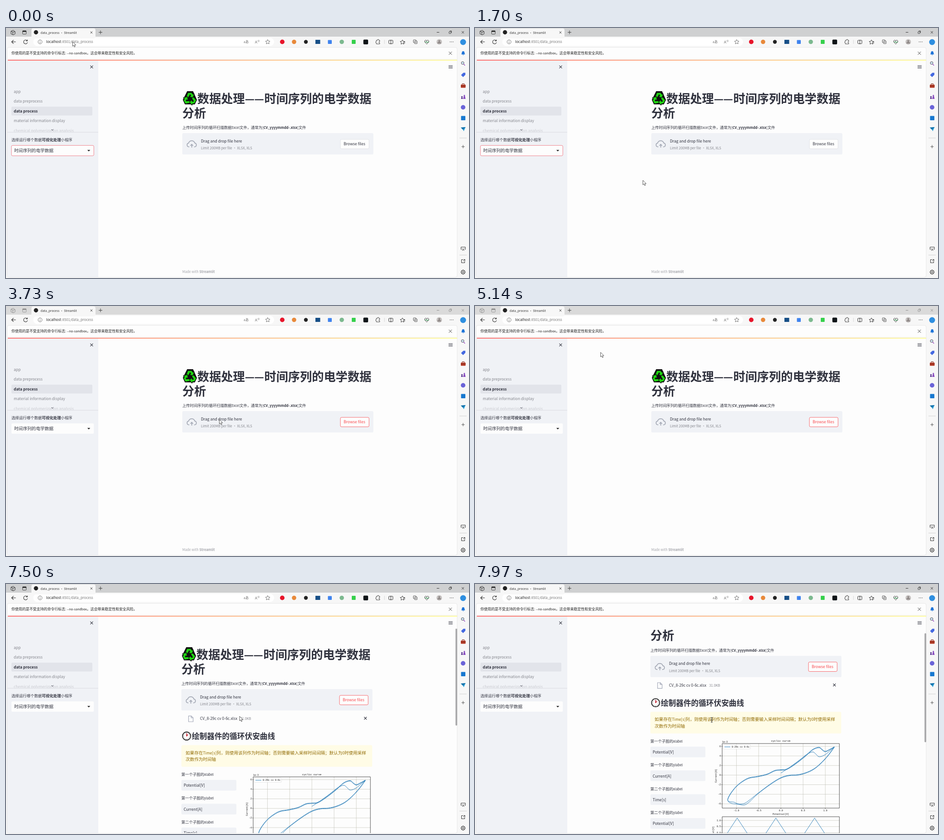
Animation, 1019 px wide and 550 px high, one loop 8 s. Source, as an HTML page with a canvas:

```html
<!DOCTYPE html>
<html lang="zh">
<head>
<meta charset="utf-8">
<style>
html, body { margin: 0; width: 100%; height: 100%; overflow: hidden; background: #f7f7f7; }
canvas { display: block; }
</style>
</head>
<body>
<canvas id="stage" width="1019" height="550"></canvas>
<script>
const LOOP = 8000;
const c = document.getElementById('stage').getContext('2d');
const SANS = '"Noto Sans CJK SC", "Noto Sans CJK JP", sans-serif';
const MONO = '"Liberation Mono", monospace';
const INK = '#31333f', DIM = '#85868d', PANEL = '#f0f2f6', RED = '#f8474c', UI = '#333', BLUE = '#1f77b4';

// Event times in ms
const HOVER = 2600, BLUR = 3050, UPLOADED = 6400, RESULTS = 6720, PLOTTED = 6980, SCROLL = 7710, IBEAM = 7800;

// Pointer stops: time, x, y
const pointer = [
  [0, 146.5, 30], [30, 150, 32], [420, 300, 130], [830, 420, 190], [1100, 560, 214], [1400, 760, 240],
  [1630, 822, 264], [1670, 560, 318], [1700, 369.5, 335], [1900, 369.5, 335], [2150, 440, 424],
  [2450, 720, 300], [2700, 772, 256], [3600, 778, 254], [3730, 470, 250], [4000, 340, 130],
  [4400, 257, 82], [4470, 256, 79], [4770, 256, 79], [4900, 260, 88], [5110, 260, 88],
  [5540, 488, 281], [5900, 488, 281], [6040, 489.5, 287], [6400, 489.5, 287], [7200, 506, 292],
  [7300, 511, 292], [7470, 513, 291.5], [7500, 514, 291], [7710, 514, 291], [7970, 521, 299]
];

const clamp = v => Math.max(0, Math.min(1, v));
const smooth = v => (v = clamp(v), v * v * (3 - 2 * v));

function pointerAt(t) {
  const i = pointer.findIndex(p => p[0] > t);
  if (i < 0) return pointer.at(-1).slice(1);
  const [t0, x0, y0] = pointer[i - 1], [t1, x1, y1] = pointer[i], k = (t - t0) / (t1 - t0);
  return [x0 + (x1 - x0) * k, y0 + (y1 - y0) * k];
}

function rect(x, y, w, h, fill, r = 0, stroke, lw = 0.8) {
  c.beginPath();
  c.roundRect(x, y, w, h, r);
  if (fill) { c.fillStyle = fill; c.fill(); }
  if (stroke) { c.strokeStyle = stroke; c.lineWidth = lw; c.stroke(); }
}
const disc = (x, y, r, fill, stroke, lw) => rect(x - r, y - r, 2 * r, 2 * r, fill, r, stroke, lw);
function line(d, color = UI, w = 0.9) {
  c.strokeStyle = color; c.lineWidth = w; c.stroke(new Path2D(d));
}
function shape(d, fill) { c.fillStyle = fill; c.fill(new Path2D(d)); }
const cross = (x, y, r, color, w) => line(`M${x - r} ${y - r}l${2 * r} ${2 * r}m0 ${-2 * r}l${-2 * r} ${2 * r}`, color, w);
function at(x, y, draw, angle = 0) {
  c.save(); c.translate(x, y); c.rotate(angle); draw(); c.restore();
}

// Text centred on y; Latin runs are set smaller than CJK runs, * toggles bold
function text(str, x, y, size, color = INK, family = SANS) {
  let bold = false;
  c.fillStyle = color;
  for (const part of str.split('*')) {
    for (const run of part.match(/[\x00-\x7f•·—]+|[^\x00-\x7f•·—]+/g) || []) {
      const px = run.charCodeAt(0) < 0x2e80 ? size / 1.117 : size;
      c.font = `${bold ? 'bold ' : ''}${px}px ${family}`;
      c.fillText(run, x, y + size * 0.36);
      x += c.measureText(run).width;
    }
    bold = !bold;
  }
}
function mono(str, x, y, size = 5, align = 'center') {
  c.font = `${size}px ${MONO}`;
  c.fillStyle = '#111';
  c.textAlign = align;
  c.fillText(str, x, y + size * 0.33);
  c.textAlign = 'left';
}

// Smooth curve through a flat list of x,y
function curve(list, color, w) {
  const p = [];
  for (let i = 0; i < list.length; i += 2) p.push([list[i], list[i + 1]]);
  c.beginPath();
  c.moveTo(...p[0]);
  for (let i = 0; i < p.length - 1; i++) {
    const a = p[i - 1] || p[i], b = p[i], d = p[i + 1], e = p[i + 2] || d;
    c.bezierCurveTo(b[0] + (d[0] - a[0]) / 6, b[1] + (d[1] - a[1]) / 6,
      d[0] - (e[0] - b[0]) / 6, d[1] - (e[1] - b[1]) / 6, d[0], d[1]);
  }
  c.strokeStyle = color; c.lineWidth = w; c.stroke();
}

function tabStrip(active) {
  const ink = active ? '#222' : '#8a8a8a';
  rect(0, 0, 1019, 19, active ? '#cfd0d1' : '#dadada');
  rect(56, 1, 141, 22, '#f7f7f7', 4);
  line('M11 7l5-2 4 3v5l-4 2-5-2zM11 7l4 2 5-1M15 9v5', ink);
  rect(36.5, 6, 8, 7.5, null, 1, ink);
  rect(36.5, 6, 8, 2.4, ink, 1);
  disc(66, 9.5, 4.7, '#222');
  text('data_process · Streamlit', 76, 9.8, 7.5, '#333');
  cross(188, 9.8, 2.3, '#333');
  line('M204 9.5h8M208 5.5v8', '#333');
  line('M948 9.5h5.5', ink);
  rect(975, 8, 4.2, 4.2, null, 1, ink);
  line('M976.5 6.5h4v4', ink);
  cross(1005.5, 9.5, 2.5, ink);
}

function toolbar() {
  rect(0, 19, 1019, 531, '#f7f7f7');
  rect(60, 21.5, 530, 18, '#fff', 9);
  line('M21.5 30.5h-9l4-4m-4 4l4 4', UI, 1.1);
  line('M46.5 28a4.3 4.3 0 1 0 .8 3.5M47 25.5v3h-3', UI, 1.1);
  disc(75, 30.5, 4.4, null, '#555');
  line('M75 30v3M75 27.8v1', '#555');
  text('localhost', 88.5, 30.3, 8.6, '#222');
  text(':8501/data_process', 121.8, 30.3, 8.6, '#777');
  text('aあ', 523, 30, 7.5, '#666');
  text('A', 548, 31, 9, '#666');
  line('M554 27q1.5 1.5 0 3M556 26q2.5 2.5 0 5', '#666', 0.7);
  const star = 'l1.5 3.2 3.5.4-2.6 2.4.7 3.5-3.1-1.8-3.1 1.8.7-3.5-2.6-2.4 3.5-.4z';
  line('M576 25.5' + star, '#666');
  disc(608, 30.5, 5, '#e8152b');
  disc(634, 30.5, 4.8, '#e8893a');
  disc(660, 30.5, 4.2, '#222');
  rect(681, 26, 10.5, 9, '#174f87');
  rect(708.5, 26.5, 8.5, 8.5, '#3f83ee', 1);
  disc(739, 30.5, 4.8, '#7cb98f');
  rect(761, 26, 8.5, 9, '#35d04b', 1);
  rect(786.5, 25.5, 10.5, 10.5, '#101518', 2);
  line('M815 27h2.5q0-2 1.5-2t1.5 2h2v3q-2 0-2 1.3t2 1.3V35H815v-2.5q-1.5 0-1.5-1.3t1.5-1.3z');
  line('M833 26v9', '#ccc', 0.8);
  rect(842.5, 27, 9, 7.5, null, 1, UI, 1);
  line('M847 26v9.5', UI, 1);
  line('M872.5 26' + star);
  line('M875.5 30.5h3M875 33h3.5', UI);
  rect(896.5, 26, 6, 6, null, 1, UI);
  rect(899, 28.5, 6, 6, '#f7f7f7', 1, UI);
  line('M902 30v3M900.5 31.5h3', UI, 0.7);
  line('M926 35.5l-4.5-4.8q-1-3.2 1.8-4 2-.2 2.7 1.8.7-2 2.7-1.8 2.8.8 1.8 4z');
  line('M922 31h2.2l1-1.5 1.5 3 1-1.5h3', '#18883a', 1);
  disc(953.5, 30.5, 6, '#c5c1c0');
  disc(953.5, 28.7, 2, '#8c8583');
  shape('M949.5 34a4 3.2 0 0 1 8 0z', '#8c8583');
  for (const x of [977.5, 980.7, 984]) disc(x, 30.5, 0.7, '#222');
}

function edgeIcons() {
  disc(1006, 31, 6.5, '#2f8fe0');
  shape('M1002 58q1.3-1.5 1.3-4 .3-3 2.9-3t2.9 3q0 2.5 1.3 4zM1004.8 58.6h2.8l-1.4 1.6z', '#1f74d8');
  disc(1005, 77, 3, '#cfe4f7', '#555', 1);
  line('M1007 79.3l3.2 3.2', '#9b4ec0', 1.5);
  shape('M1001.5 103.5l5-5h4.5v4.5l-5 5z', '#4468e0');
  rect(1001, 124.5, 10.5, 7, '#b53a26', 1);
  line('M1004 124.5v-2h4.5v2M1001 127.5h10.5', '#7c2b1c', 1);
  shape('M1001.5 156l1-4-1-2h4l-1 2 1 4z', '#5d3a91');
  shape('M1006 156l1.5-6q-.5-3 1.3-3t1.4 3l1.3 6z', '#8a4fc0');
  disc(1006, 174.5, 5, '#6a63d8');
  rect(1001.5, 193.5, 9.5, 9.5, '#1778d0', 1);
  shape('M1001 219l10.5-1-4 9-2-3.5z', '#2ba0d8');
  shape('M1001 219l10.5-1-6 5.5z', '#1670a8');
  line('M998 242h16M998 499.5h16', '#ccc', 0.9);
  line('M1002.5 261h7M1006 257.5v7', '#444');
  line('M1003 487h-1.5v-5h9.5v5h-1.5M1004 490l4.5-5m0 5l-4.5-5', UI, 1);
  line('M1006 509.5h-3.5v7h7V513M1007 509.3h3v3M1006 513.3l4-4', UI, 1);
  disc(1006, 537, 1.6, null, UI, 1);
  disc(1006, 537, 4, null, UI, 1.1);
  for (let i = 0; i < 8; i++) at(1006, 537, () => line('M0-4v-1.2', UI, 1.6), i * Math.PI / 4);
}

function pageFrame() {
  rect(2.5, 42.5, 990.5, 506, '#fdfdfd', 4, '#e3e3e3');
  text('你使用的是不受支持的命令行标志: --no-sandbox。这会带来稳定性和安全风险。', 12, 55.3, 7.9, '#222');
  cross(978, 55.5, 3.4, '#333');
  line('M4 69h988', '#e8e8e8', 0.8);
}

function sidebar(focused) {
  rect(3, 71.5, 200, 476.5, PANEL, [0, 0, 0, 4]);
  cross(188.5, 85.7, 3, INK, 1.1);
  rect(12, 173, 178, 19.5, '#e2e4ea', 2);
  text('app', 17, 139.7, 9.55, DIM);
  text('data preprocess', 17, 161, 9.55, DIM);
  text('*data process', 17, 182.4, 9.55);
  text('material information display', 17, 204, 9.55, DIM);
  c.save();
  c.beginPath(); c.rect(3, 215, 200, 13.5); c.clip();
  text('chemical polymerization analysis', 17, 225.5, 9.55, '#c9cad0');
  c.restore();
  line('M100 223l2.2 2.2 2.2-2.2', INK, 1);
  line('M3 229.3h200', '#d5d7dd', 0.8);
  text('选择运行哪个数据*可视化处理*小程序', 12, 245.6, 8.4);
  rect(12, 258.3, 181.3, 22.8, '#fdfdfd', 2.5, focused ? '#ee6470' : null);
  text('时间序列的电学数据', 18, 269.8, 9.6);
  shape('M179 268.3h6.4l-3.2 3.2z', '#222');
}

function recycleIcon(x, y) {
  at(x, y, () => {
    c.lineJoin = 'round';
    shape('M-6-16H7L15.5 3 11 13H-11L-15.5 3z', '#111');
    for (let i = 0; i < 3; i++) at(0, 1, () => {
      const arm = 'M-8-4.5L-4.5-14H4L6-10.5 9.5-11 7-2-1-5 2-7 .5-9.5-3.5-2.5z';
      shape(arm, '#1fd510');
      line(arm, '#111', 1.3);
    }, i * Math.PI * 2 / 3);
    c.lineJoin = 'miter';
  });
}

function uploader(hot) {
  recycleIcon(404.7, 155);
  text('*数据处理', 421, 155.8, 26.2);
  text('*——', 526, 156, 23.2, INK, '"Noto Sans", sans-serif');
  text('*时间序列的电学数据', 568.5, 155.8, 26.2);
  text('*分析', 388, 187.3, 26.2);
  text('上传时间序列的循环扫描数据Excel文件，通常为[*CV_yyyymmdd-.xlsx*]文件', 388, 219.3, 8.36);
  rect(388, 231.3, 420.5, 47, PANEL, 2.5);
  line('M403.5 261.5h-1.2a4.2 4.2 0 0 1-.4-8.3 7.1 7.1 0 0 1 13.6 0 4.2 4.2 0 0 1-.3 8.3h-1.4M408.8 263v-7m-3 3l3-3 3 3', '#a3a8b4', 1.7);
  text('Drag and drop file here', 429, 248.3, 9.55);
  text('Limit 200MB per file • XLSX, XLS', 429, 264, 8.36, DIM);
  rect(736, 245, 63, 20.8, '#fdfdfd', 2.5, hot ? RED : '#dcdee3');
  text('Browse files', 743, 255, 9.55, hot ? RED : INK);
}

function fileRow() {
  line('M403.8 290.3h6l4 4v8.7h-10zM409.5 290.5v4h4', '#a3a8b8', 1.2);
  text('CV_8-29c cv 0-6c.xlsx', 429, 295.7, 9.4);
  text('31.0KB', 517.5, 296, 8.2, DIM);
  cross(793, 295.4, 2.9, INK, 1.1);
}

function results() {
  disc(399.5, 334.5, 9, '#fff', '#222', 1.8);
  for (let i = 0; i < 12; i++) at(399.5, 334.5, () => line('M0-7.4v1.6', '#555', 0.8), i * Math.PI / 6);
  line('M399.5 335v-6.5', '#c4202f', 1.6);
  line('M399.5 335l2.5-4', '#c4202f', 1.6);
  text('*绘制器件的循环伏安曲线', 411, 335, 16.65);
  rect(388, 354.5, 420, 47.5, '#fffce6', 2.5);
  text('如果存在Time[s]列，则使用该列作为时间轴；否则需要输入采样时间间隔；默认为0时使用采样', 397.3, 371.2, 9.55, '#926c05');
  text('次数作为时间轴', 397.3, 385.6, 9.55, '#926c05');
  const fields = [['第一个子图的xlabel', 'Potential[V]'], ['第一个子图的ylabel', 'Current[A]'],
    ['第二个子图的xlabel', 'Time[s]'], ['第二个子图的ylabel', 'Potential[V]']];
  fields.forEach(([label, value], i) => {
    const y = 419 + i * 52.4;
    text(label, 388, y, 8.36);
    rect(388, y + 12, 121, 23.5, PANEL, 2.5);
    text(value, 393, y + 24, 9.55);
  });
}

// Plot coordinates are those of the page scrolled by 73.3
function plot() {
  for (let i = -2; i < 3; i++) {
    const x = 673.2 + i * 48.9;
    line(`M${x} 351v142`, '#b9b9ae', 0.6);
    line(`M${x} 493v2`, '#222', 0.6);
    mono((i / 2).toFixed(1), x, 498.5);
  }
  for (let i = -3; i < 4; i++) {
    const y = 420.4 - i * 21.1;
    line(`M544 ${y}h258`, '#b9b9ae', 0.6);
    line(`M542 ${y}h2`, '#222', 0.6);
    mono(2 * i, 541, y, 5, 'right');
  }
  curve([673, 416, 690, 405, 712, 389, 730, 375, 743, 369.5, 750, 374, 757, 380, 768, 377, 780, 368, 791, 358], BLUE, 0.9);
  const lower = [791, 358, 776, 378, 760, 395, 745, 407, 728, 415, 710, 419.5, 692, 420.5, 673, 426, 650, 440, 622, 461];
  const upper = [590, 433, 604, 426, 622, 423, 643, 418, 660, 410, 673, 408.5, 686, 407, 704, 396, 726, 379, 743, 364, 757, 359, 764, 364, 771, 368, 780, 364, 791, 358];
  curve([...lower, 602, 477, 592, 483, 580, 484, 570, 480, 561, 479, 556, 475, 561, 463, 574, 446, ...upper], BLUE, 0.9);
  c.save();
  c.translate(0, 1.2);
  curve([...lower, 603, 479, 592, 485, 577, 483, 566, 482, 558, 478, 557, 471, 565, 457, 577, 443, ...upper], BLUE, 0.9);
  c.restore();
  rect(544, 351, 258, 142, null, 0, '#222', 0.8);
  rect(546, 353.5, 60, 9.5, 'rgba(255,255,255,.85)', 1, '#ccc', 0.5);
  line('M549 358.4h13', BLUE, 0.9);
  mono('8-29c cv 0-6c', 565, 358.5, 5, 'left');
  mono('1e-3', 544, 347.5, 5, 'left');
  mono('cyclic curve', 673, 345.5, 5.9);
  mono('Potential[V]', 673, 506, 5);
  at(530, 422, () => mono('Current[A]', 0, 0), -Math.PI / 2);

  for (let i = 0; i < 3; i++) {
    const y = 520.2 + i * 13.5;
    line(`M544 ${y}h258`, '#b9b9ae', 0.6);
    line(`M542 ${y}h2`, '#222', 0.6);
    mono((1 - i / 2).toFixed(1), 541, y, 5, 'right');
  }
  let wave = 'M555.5 547.6';
  for (let i = 0; i < 3; i++) wave += `L${577 + i * 85.2} 514.8L${619.6 + i * 85.2} 579.5`;
  line(wave, BLUE, 0.9);
  rect(544, 512, 258, 80, null, 0, '#222', 0.8);
  at(524, 551, () => mono('Potential[V]', 0, 0), -Math.PI / 2);
}

function runningStatus(alpha) {
  c.globalAlpha = alpha;
  disc(877, 80.8, 1.3, '#777');
  line('M872 83.5h10M877 83v3M875.5 84v6.5M878.5 84v6.5', '#777', 1.3);
  text('RUNNING...', 889, 85.5, 8.36, '#a8a9af');
  text('Stop', 941, 85.5, 8.36, '#55565f');
  c.globalAlpha = 1;
}

function cursor(x, y, ibeam) {
  if (ibeam) return line(`M${x - 2} ${y - 5}h4m-2 0v10m-2 0h4m-4-4.7h4`, '#222', 0.9);
  at(x, y, () => {
    const d = 'M0 0v10l2.3-2.1 1.6 3.8 1.8-.8-1.6-3.6h3.1z';
    shape(d, '#fff');
    line(d, '#333', 0.8);
  });
}

function draw(t) {
  const away = t >= BLUR && t < UPLOADED;
  const done = t >= RESULTS;
  const scroll = 73.3 * smooth((t - SCROLL) / 260);

  toolbar();
  tabStrip(!away);
  edgeIcons();
  pageFrame();

  c.save();
  c.beginPath(); c.rect(203, 98.5, 790, 449.5); c.clip();
  if (done) rect(989.3, 71.5 + scroll * 0.5, 3.7, 240, '#a9a9ab', 1.8);
  c.translate(done ? -2 : 0, -scroll);
  uploader(t >= HOVER);
  if (t >= UPLOADED + 40) fileRow();
  if (done) results();
  else text('Made with *Streamlit', 388, 535.8, 8.3, '#a4a5ab');
  if (t >= PLOTTED) { c.translate(2, 73.3); plot(); }
  c.restore();

  sidebar(t < BLUR);
  const deco = c.createLinearGradient(4, 0, 993, 0);
  deco.addColorStop(0, '#ff4b4b');
  deco.addColorStop(1, '#fffd80');
  rect(4, 70, 989, 1.5, deco);
  line('M974 82.7h9M974 85.5h9M974 88.3h9', INK, 1.1);
  if (t > 6480 && t < PLOTTED) runningStatus(clamp((t - 6480) / 300));
  cursor(...pointerAt(t), t >= IBEAM);
}

function tick() {
  draw(performance.now() % LOOP);
  requestAnimationFrame(tick);
}
tick();
</script>
</body>
</html>
```
